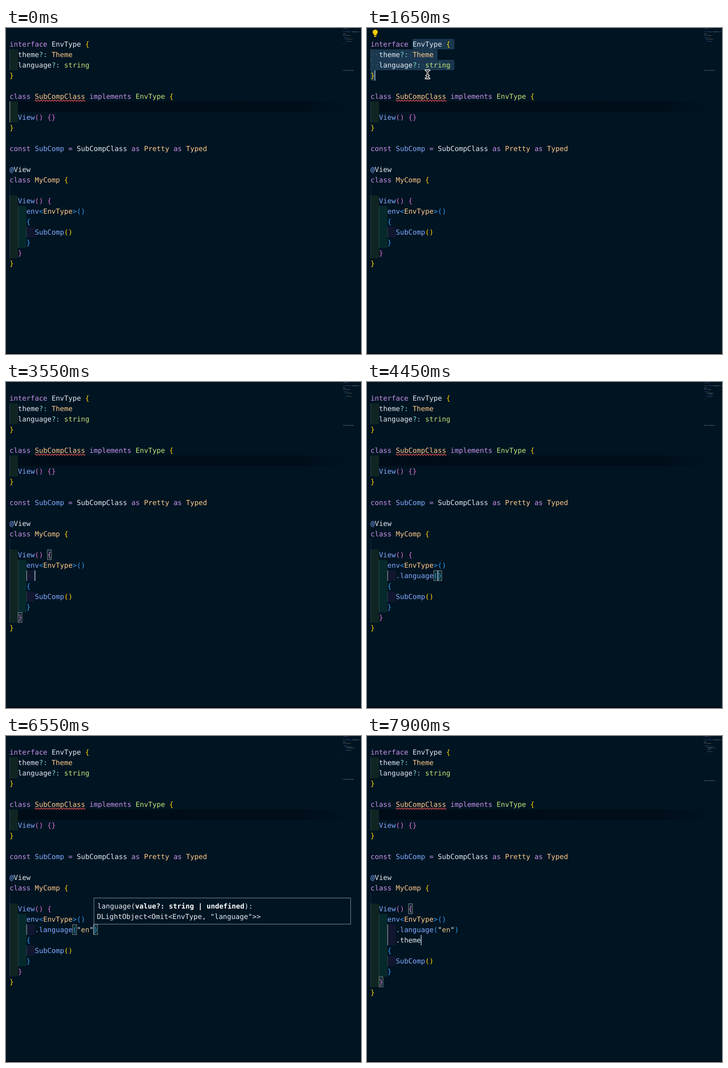
Animation, 780 px wide and 718 px high, one loop 8000 ms. Source, as an HTML page:

```html
<!DOCTYPE html>
<html lang="en">
<head>
<meta charset="utf-8">
<title>Typing in a code editor</title>
<style>
  html, body { margin: 0; height: 100%; overflow: hidden; background: #001422; }
  svg { display: block; width: 780px; height: 718px; }
  text {
    font: 15.34px "DejaVu Sans Mono", monospace;
    white-space: pre;
    text-rendering: geometricPrecision;
  }
  #mini text { font-weight: bold; }
</style>
</head>
<body>
<svg viewBox="0 0 780 718">
  <defs>
    <linearGradient id="shade">
      <stop offset="0" stop-color="#000a14" stop-opacity=".75"/>
      <stop offset=".85" stop-color="#000a14" stop-opacity=".6"/>
      <stop offset="1" stop-color="#000a14" stop-opacity="0"/>
    </linearGradient>
  </defs>
  <rect width="780" height="718" fill="#001422"/>
  <rect x="26" y="162" width="730" height="23" fill="url(#shade)"/>
  <g id="editor"></g>
  <g id="mini" transform="translate(738.9 -20.8) scale(.1387 .111)" opacity=".85"></g>
  <rect id="caret" width="2" height="23" fill="#8ba7bf"/>
  <g id="popup">
    <rect x=".5" y="356.8" width="564" height="57.6" fill="#001422" stroke="#60788a" stroke-width="1.4"/>
    <text x="8" y="379.5" fill="#e8edf4">language(<tspan font-weight="bold" fill="#fff">value?: string | undefined</tspan>):</text>
    <text x="7" y="402.5" fill="#e8edf4">DLightObject&lt;Omit&lt;EnvType, "language"&gt;&gt;</text>
  </g>
  <g id="pointer" fill="none" stroke-linecap="round">
    <path id="beam" d="M-4-9Q0-9 0-6Q0-9 4-9M0-6V6M-4 9Q0 9 0 6Q0 9 4 9M-2.5 3H2.5" stroke="#fff" stroke-width="4"/>
    <use href="#beam"/>
    <path d="M-4-9Q0-9 0-6Q0-9 4-9M0-6V6M-4 9Q0 9 0 6Q0 9 4 9M-2.5 3H2.5" stroke="#000" stroke-width="1.4"/>
  </g>
  <rect y="716" width="780" height="2" fill="#00070f"/>
</svg>
<script>
const LOOP = 8000, LEFT = 7.8, TOP = 24, CHAR = 9.233, LINE = 23;
const $ = id => document.getElementById(id);
const colX = col => LEFT + col * CHAR;
const rowY = row => TOP + row * LINE;

// Each token starts with a style letter; an upper case letter means italic.
const COLORS = {
  k: '#c792ea', t: '#ffcb8b', w: '#e3e9f1', g: '#c5e478', o: '#7fdbca', b: '#82aaff',
  y: '#ffd700', p: '#da70d6', u: '#2f9df4', s: '#ecc48d', q: '#e6f5ea'
};
const HEAD = [
  'kinterface |wEnvType |y{',
  'w  theme|o?: |tTheme',
  'w  language|o?: |gstring',
  'y}',
  '',
  'kclass |tSubCompClass |Kimplements |gEnvType |y{',
  'w  ',
  'B  View|p() {}',
  'y}',
  '',
  'kconst |BSubComp |K= |WSubCompClass |Kas |TPretty |Kas |TTyped',
  '',
  'b@|wView',
  'kclass |tMyComp |y{',
  '',
  'B  View|p() {',
  'B    env|u<|tEnvType|u>()'
];
const TAIL = ['u    {', 'B      SubComp|y()', 'u    }', 'p  }', 'y}',
  ...Array(21).fill(''), 'wconsole.log(MyComp)'];
const WORDS = [[0, 10], [5, 30], [16, 8]];
const INDENT = ['#102522', '#062a2c', '#11162f'];

// Every step changes only the named parts of the editor state.
const steps = [];
const at = (t, change) => steps.push({ ...steps.at(-1), ...change, t });
const call = inside => 'B      .language|u(' + (inside ? '|q"|s' + inside[0] + '|q"' : '') + '|u)';
const quoted = s => call([s]);
const type = (t, end, word, row, before) => {
  for (let n = 1; n <= word.length; n++)
    at(t + (end - t) * (n - 1) / (word.length - 1),
      { added: [...before, 'w      .' + word.slice(0, n)], caret: [row, 7 + n] });
};

at(0, { added: [], caret: null, sel: null, words: false, pair: [], bulb: null, guide: [0, 6, 7], popup: false });
at(800, { caret: [0, 17], sel: [0, 10, 0, 17], words: true, guide: [0, 1, 2] });
at(950, { bulb: -1 });
at(1150, { caret: [1, 14], sel: [0, 10, 1, 14], words: false });
at(1250, { caret: [2, 14], sel: [0, 10, 2, 14] });
at(1350, { caret: [3, 1], sel: [0, 10, 3, 1] });
at(2400, { caret: [16, 12], sel: null, words: true, bulb: null, guide: [2, 16, 19] });
at(2500, { caret: [16, 15], sel: [16, 8, 16, 15] });
at(2650, { bulb: 16 });
at(3000, { caret: [16, 18], sel: null, words: false, bulb: null, pair: [[16, 16], [16, 17]] });
at(3400, { added: ['w      '], caret: [17, 6], pair: [[15, 9], [21, 2]], guide: [4, 17, 17] });
at(3700, { added: ['w      .'], caret: [17, 7] });
type(4150, 4400, 'language', 17, []);
at(4450, { added: [call()], caret: [17, 16], pair: [[17, 15], [17, 16]] });
at(4650, { popup: true });
at(5000, { added: [quoted('')], caret: [17, 17], pair: [[17, 15], [17, 18]] });
at(6300, { added: [quoted('e')], caret: [17, 18], pair: [[17, 15], [17, 19]] });
at(6350, { added: [quoted('en')], caret: [17, 19], pair: [[17, 15], [17, 20]] });
at(6550, { caret: [17, 20] });
at(6700, { caret: [17, 21], popup: false });
at(6950, { added: [quoted('en'), 'w      '], caret: [18, 6], pair: [[15, 9], [22, 2]], guide: [4, 17, 18] });
at(7350, { added: [quoted('en'), 'w      .'], caret: [18, 7] });
type(7650, 7850, 'theme', 18, [quoted('en')]);

const PATH = [[250, 150, 445], [700, 130, 38], [1150, 130, 38], [1450, 133, 102], [1950, 133, 102],
  [2400, 118, 404], [2500, 118, 404], [2700, 151, 406], [2800, 151, 406], [3000, 178, 404], [3250, 202, 397]];

const rect = (x, y, w, h, fill, more = '') =>
  `<rect x="${x}" y="${y}" width="${w}" height="${h}" fill="${fill}" ${more}/>`;
const cells = (row, col, n, fill, more) => rect(colX(col), rowY(row), n * CHAR, LINE, fill, more);
const tokens = line => line ? line.split('|') : [];
const plain = line => tokens(line).map(s => s.slice(1)).join('');
const escape = s => s.replace(/&/g, '&amp;').replace(/</g, '&lt;');

function lineText(line, row) {
  let col = 0;
  return tokens(line).map(token => {
    const letter = token[0].toLowerCase(), body = token.slice(1), word = body.trimStart();
    const x = colX(col + body.length - word.length);
    const italic = letter !== token[0] ? ' font-style="italic"' : '';
    col += body.length;
    return word && `<text x="${x}" y="${rowY(row) + 17}" fill="${COLORS[letter]}"${italic}>${escape(word)}</text>`;
  }).join('');
}

function indents(lines, [level, first, last]) {
  return lines.map((line, row) => {
    const text = plain(line), depth = text.length - text.trimStart().length;
    let out = row === 14 ? rect(LEFT, rowY(row), 1, LINE, '#163352') : '';
    for (let col = 0; col < depth; col += 2) {
      const active = col === level && row >= first && row <= last;
      out += cells(row, col, 2, INDENT[col / 2]) +
        rect(colX(col), rowY(row), active ? 1.4 : 1, LINE, active ? '#8c9a9c' : '#34474f');
    }
    return out;
  }).join('');
}

function selection(lines, [r0, c0, r1, c1]) {
  let out = '';
  for (let row = r0; row <= r1; row++) {
    const text = plain(lines[row]);
    const from = row === r0 ? c0 : 0, to = row === r1 ? c1 : text.length + .95;
    out += cells(row, from, to - from, '#1d3b53', 'rx="3" opacity=".93"');
    for (let col = from; col < Math.min(to, text.length); col++)
      if (text[col] === ' ')
        out += `<circle cx="${colX(col + .5)}" cy="${rowY(row) + 11.5}" r="1.1" fill="#48647a"/>`;
  }
  return out;
}

const bulb = row => `<g transform="translate(18 ${rowY(row) + 9})" fill="#ffcc00">
  <circle cy="-1" r="5.6"/><path d="M-3 2H3V6H-3zM-2.5 7H2.5V8.5Q0 11-2.5 8.5z"/></g>`;

const squiggle = `<path d="M${colX(6)} 160q1.54-3 3.08 0${'t3.08 0'.repeat(35)}"
  fill="none" stroke="#ef5350" stroke-width="1.3"/>`;

function draw(state) {
  const lines = [...HEAD, ...state.added, ...TAIL];
  const text = lines.map(lineText).join('');
  const mark = fill => state.words ? WORDS.map(([r, c]) => cells(r, c, 7, fill)).join('') : '';
  $('editor').innerHTML = indents(lines, state.guide) +
    (state.sel ? selection(lines, state.sel) : '') + mark('#4f5474') +
    state.pair.map(([r, c]) => rect(colX(c) + .2, rowY(r) + .5, CHAR - .6, LINE - 1, '#0a2a2c',
      'stroke="#8b8f92"')).join('') +
    text + squiggle + (state.bulb === null ? '' : bulb(state.bulb));
  $('mini').innerHTML = mark('#77774a') + text;
  if (state.caret) {
    const [row, col] = state.caret;
    $('caret').setAttribute('x', colX(col) - .6);
    $('caret').setAttribute('y', rowY(row));
    $('popup').setAttribute('transform', `translate(${colX(col) + .3} 0)`);
  }
  $('popup').style.display = state.popup ? '' : 'none';
}

function movePointer(t) {
  const shown = t >= 250 && t < 3400;
  $('pointer').style.display = shown ? '' : 'none';
  if (!shown) return;
  const i = PATH.findLastIndex(p => p[0] <= t);
  const [t0, x0, y0] = PATH[i], [t1, x1, y1] = PATH[i + 1] || [t0 + 1, x0, y0];
  const k = Math.min(1, (t - t0) / (t1 - t0)), ease = k * k * (3 - 2 * k);
  $('pointer').setAttribute('transform', `translate(${x0 + (x1 - x0) * ease} ${y0 + (y1 - y0) * ease})`);
}

let shownState;
function frame() {
  const t = performance.now() % LOOP;
  const state = steps.findLast(s => s.t <= t);
  if (state !== shownState) draw(shownState = state);
  const blinkedOff = t >= 5700 && t < 6000;
  $('caret').style.display = state.caret && !blinkedOff ? '' : 'none';
  movePointer(t);
  requestAnimationFrame(frame);
}
frame();
</script>
</body>
</html>
```
